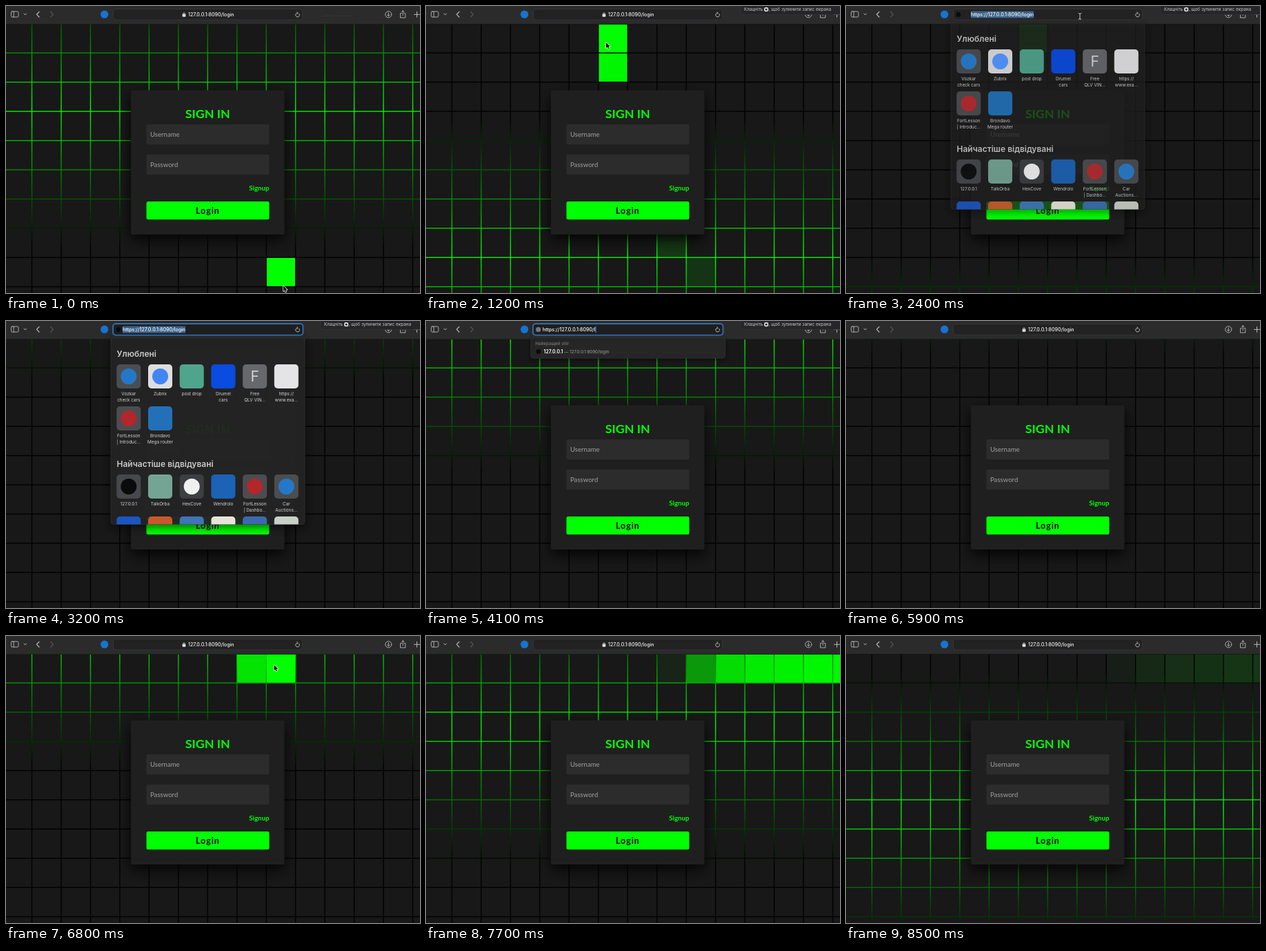
Recreate the animation shown at these times as an HTML page with a canvas. Size 600x417 px, loop 8.6 s.

```html
<!DOCTYPE html>
<html lang="uk">
<head>
<meta charset="utf-8">
<title>Sign in</title>
<style>
html, body { margin: 0; width: 100%; height: 100%; overflow: hidden; background: #181818; }
canvas { display: block; width: 600px; height: 417px; }
</style>
</head>
<body>
<canvas id="stage"></canvas>
<script>
const W = 600, H = 417, LOOP = 8600, STEP = 100;
const UI = 'Inter, "Noto Sans", sans-serif', FORM = 'Lato, "Open Sans", sans-serif';
const GREEN = '#00ff00';
const PITCH = 42.46, GRID_X = -47.4, GRID_Y = 25.7, GAP = 1.35;
const VIEW_H = 400, FADE = 1500;
const CARD = { x: 181, y: 122.5, w: 222.5, h: 209.5 };

const canvas = document.getElementById('stage');
const g = canvas.getContext('2d');
const dpr = window.devicePixelRatio || 1;
canvas.width = W * dpr;
canvas.height = H * dpr;

// Gradient centre, unwrapped: [time, y]; the page reloads at 5750
const bandKeys = [[0, 150], [1200, 362], [2400, 568], [4100, 818], [5200, 1000], [5740, 1086],
  [5750, -174.3], [6800, -8], [8500, 252], [8600, 268]];
// Pointer: [time, x, y]
const mouseKeys = [[0, 402, 406.5], [250, 402, 405], [300, 386, 374], [310, 368, 358], [360, 350, 326],
  [1000, 280, 130], [1010, 275, 105], [1100, 266, 72], [1200, 261, 53], [1500, 261, 50], [1700, 280, 30],
  [1800, 300, 14], [1950, 339, 15], [6300, 339, 15], [6500, 341, 40], [6600, 365, 46], [6640, 380, 46],
  [6700, 388, 43], [6800, 388.5, 42], [7100, 390, 42], [7300, 418, 45], [7500, 462, 46],
  [7560, 500, 45], [7640, 606, 44]];

// Address field edits: [time, typed path, suggested rest]
const edits = [[3300, 'login', ''], [3500, 'logi', ''], [3700, 'log', ''], [3900, 'lo', ''], [4000, 'l', ''],
  [4300, '', ''], [4600, 'r', 'oom'], [4800, 'ro', 'om'], [5000, 'roo', 'm']];

const clamp = v => Math.max(0, Math.min(1, v));
const mix = (a, b, p) => a + (b - a) * p;

function track(keys, t) {
  let i = keys.findIndex(k => k[0] > t);
  if (i < 0) return keys[keys.length - 1].slice(1);
  const a = keys[i - 1], b = keys[i], p = (t - a[0]) / (b[0] - a[0]);
  return a.slice(1).map((v, n) => mix(v, b[n + 1], p));
}

// CSS "ease"
function ease(x) {
  let lo = 0, hi = 1;
  for (let i = 0; i < 20; i++) {
    const s = (lo + hi) / 2, q = 1 - s;
    if (0.75 * q * q * s + 0.75 * q * s * s + s ** 3 < x) lo = s; else hi = s;
  }
  return 0.3 * (1 - lo) ** 2 * lo + 3 * (1 - lo) * lo * lo + lo ** 3;
}

function box(x, y, w, h, r, fill, stroke, lw = 1) {
  g.beginPath();
  g.roundRect(x, y, w, h, r);
  if (fill) { g.fillStyle = fill; g.fill(); }
  if (stroke) { g.strokeStyle = stroke; g.lineWidth = lw; g.stroke(); }
}

function dot(x, y, r, fill) {
  g.beginPath();
  g.arc(x, y, r, 0, 7);
  g.fillStyle = fill;
  g.fill();
}

function line(points, color, lw = 1) {
  g.beginPath();
  points.forEach(([x, y], i) => i ? g.lineTo(x, y) : g.moveTo(x, y));
  g.strokeStyle = color;
  g.lineWidth = lw;
  g.stroke();
}

function text(str, x, y, size, color, { font = UI, weight = 400, align = 'left', gap = 0 } = {}) {
  g.font = `${weight} ${size}px ${font}`;
  g.textAlign = align;
  g.textBaseline = 'alphabetic';
  g.letterSpacing = gap + 'px';
  g.fillStyle = color;
  g.fillText(str, x, y);
  const width = g.measureText(str).width;
  g.letterSpacing = '0px';
  return width;
}

function shadow(y, blur, alpha) {
  g.shadowColor = `rgba(0,0,0,${alpha})`;
  g.shadowOffsetY = y * dpr;
  g.shadowBlur = blur * dpr;
}

// Cells fade out after the pointer leaves them
function litCells(t) {
  const last = new Map();
  for (let s = Math.max(0, t - FADE); s <= t; s += 10) {
    const [x, y] = track(mouseKeys, s);
    const onCard = x > CARD.x && x < CARD.x + CARD.w && y > CARD.y && y < CARD.y + CARD.h;
    if (y < 26.5 || x > W || onCard) continue;
    last.set(Math.floor((x - GRID_X) / PITCH) + ',' + Math.floor((y - GRID_Y) / PITCH), s);
  }
  return last;
}

function drawGrid(t) {
  const top = GRID_Y - VIEW_H / 2;
  const raw = track(bandKeys, t)[0] - top;
  const mid = top + (raw + 2 * VIEW_H) % (2 * VIEW_H);
  const band = g.createLinearGradient(0, mid - VIEW_H / 2, 0, mid + VIEW_H / 2);
  band.addColorStop(0, '#000');
  band.addColorStop(0.5, GREEN);
  band.addColorStop(1, '#000');
  g.fillStyle = band;
  g.fillRect(0, 0, W, H);
  const lit = litCells(t);
  for (let r = 0; r < 10; r++) {
    for (let c = 1; c < 16; c++) {
      const s = lit.get(c + ',' + r);
      const p = s === undefined ? 0 : 1 - ease((t - s) / FADE);
      const rb = Math.round(mix(24, 0, p));
      g.fillStyle = `rgb(${rb},${Math.round(mix(24, 255, p))},${rb})`;
      g.fillRect(GRID_X + c * PITCH + GAP / 2, GRID_Y + r * PITCH + GAP / 2, PITCH - GAP, PITCH - GAP);
    }
  }
}

function drawCard() {
  g.save();
  shadow(8, 20, 0.85);
  box(CARD.x, CARD.y, CARD.w, CARD.h, 2, '#1f1f1f');
  g.restore();
  text('SIGN IN', 292.3, 162.5, 17.8, GREEN, { font: FORM, weight: 700, align: 'center' });
  [['Username', 172], ['Password', 215.8]].forEach(([label, y]) => {
    box(203.5, y, 178, 29.3, 2, '#2c2c2c');
    text(label, 209, y + 17.8, 9.6, '#a0a0a0', { font: FORM });
  });
  text('Signup', 381.5, 268, 9.7, GREEN, { font: FORM, weight: 700, align: 'right' });
  box(203.5, 284, 178, 26.2, 2.5, GREEN);
  text('Login', 275, 301.6, 12.4, '#000', { font: FORM, weight: 700, gap: 1 });
}

function drawToolbar() {
  const ink = '#b8b8b8';
  g.fillStyle = '#2b2b2c';
  g.fillRect(0, 0, W, 26.5);
  g.fillStyle = '#151515';
  g.fillRect(0, 26, W, 0.7);
  g.lineCap = g.lineJoin = 'round';
  box(7.5, 8, 10.5, 8, 1.5, null, ink, 0.9);
  line([[11.2, 8], [11.2, 16]], ink, 0.9);
  line([[26, 11], [27.8, 12.9], [29.6, 11]], ink);
  line([[48, 8.5], [44.4, 12.2], [48, 16]], ink, 1.2);
  line([[64.8, 8.5], [68.4, 12.2], [64.8, 16]], '#555', 1.2);
  dot(142.7, 12.2, 5.6, '#1674d1');
  g.beginPath();
  g.arc(554.3, 12.3, 4.6, 0, 7);
  g.strokeStyle = ink;
  g.lineWidth = 0.9;
  g.stroke();
  line([[554.3, 9.7], [554.3, 14.6]], ink, 0.9);
  line([[552.4, 12.8], [554.3, 14.7], [556.2, 12.8]], ink, 0.9);
  line([[573.3, 10.5], [571.6, 10.5], [571.6, 17], [578.8, 17], [578.8, 10.5], [577.1, 10.5]], ink, 0.9);
  line([[575.2, 13.6], [575.2, 6.8]], ink, 0.9);
  line([[573.4, 8.5], [575.2, 6.7], [577, 8.5]], ink, 0.9);
  line([[591.5, 12.3], [599.5, 12.3]], ink);
  line([[595.5, 8.3], [595.5, 16.3]], ink);
}

function drawReload() {
  g.beginPath();
  g.arc(422.6, 13, 2.9, -0.6, 4.6);
  g.strokeStyle = '#c4c4c4';
  g.lineWidth = 0.9;
  g.stroke();
  line([[421.8, 8.6], [423.4, 10.1], [421.8, 11.5]], '#c4c4c4', 0.8);
}

function suggestions(path, active) {
  g.save();
  shadow(2, 5, 0.5);
  box(152, 24, 281.5, 30, 4, '#262626', '#3b3b3b', 0.7);
  g.restore();
  text('Найкращий збіг', 158.5, 34.6, 6.2, '#6e6e6e', { weight: 600 });
  if (active) box(154.5, 38.8, 275.5, 11.2, 2.5, '#1656b4');
  dot(163, 44.4, 3.5, '#0b0b0d');
  const w = text('127.0.0.1', 170.5, 46.8, 7, '#fff', { weight: 600 });
  text(' — 127.0.0.1:8090/' + path, 170.5 + w, 46.6, 6.2, active ? '#d7e4f6' : '#a3a3a3');
}

function drawAddress(t) {
  const size = 7.05, base = 15.2, host = '127.0.0.1:8090/';
  const focused = t >= 2300 && t < 5600;
  box(155.5, 4.5, 274, 15.6, 4, '#222223', '#3c3c3d', 0.7);
  if (!focused) {
    box(255.6, 11.6, 4.8, 4.1, 0.8, '#ddd');
    g.beginPath();
    g.arc(258, 11.4, 1.5, Math.PI, 0);
    g.strokeStyle = '#ddd';
    g.lineWidth = 0.8;
    g.stroke();
    text(host + 'login', 264, base, size, '#f2f2f2', { weight: 500 });
    drawReload();
    return;
  }
  const edit = edits.filter(e => e[0] <= t).pop();
  if (edit) suggestions(edit[2] ? 'room' : 'login', !!edit[2]);
  if (t >= 2500) box(155, 4, 275.5, 16.6, 4, '#1e1e1f', '#2d6cae', 1.9);
  const x = t < 2400 ? 212 : t < 2500 ? 181 : 169;
  const url = 'https://' + host;
  if (edit && !edit[2]) dot(162.8, 12.4, 3.6, '#777');
  else dot(162.8, 12.4, 3.4, '#0b0b0d');
  g.font = `500 ${size}px ${UI}`;
  if (!edit) {
    const w = g.measureText(url + 'login').width;
    box(x, 7.6, w, 10, 0, '#3c638b');
    text(url + 'login', x, base, size, '#fff', { weight: 500 });
  } else {
    const end = x + text(url + edit[1], x, base, size, '#fff', { weight: 500 });
    if (edit[2]) {
      const tail = ' — 127.0.0.1';
      const w = g.measureText(edit[2] + tail).width;
      box(end, 7.6, w, 10, 0, '#2a578f');
      const head = text(edit[2], end, base, size, '#fff', { weight: 500 });
      text(tail, end + head, base, size, '#6b9ad6', { weight: 500 });
    } else {
      line([[end + 0.6, 8], [end + 0.6, 17]], '#4a9bff', 0.9);
    }
  }
  drawReload();
}

// Tiles: [first line, second line, tile colour, mark colour, letter]
const favourites = [
  ['Vozkar', 'check cars', '#4b4d50', '#2478c8'],
  ['Zubrix', '', '#dedede', '#4285f4'],
  ['post drop', '', '#4fa58c'],
  ['Drumel', 'cars', '#0a4be0'],
  ['Free', 'QLV VIN…', '#66686c', null, 'F'],
  ['https://', 'www.exa…', '#e4e4e6'],
  ['FortLesson', '| Introduc…', '#4b4d50', '#b3262b'],
  ['Brondavo', 'Mega router', '#2271b8']
];
const visited = [
  ['127.0.0.1', '', '#46484b', '#0b0b0d'],
  ['TalkOrba', '', '#74a594'],
  ['HexCove', '', '#3c3e42', '#f0f0f0'],
  ['Wendrolo', '', '#1c62b5'],
  ['FortLesson', '| Dashbo…', '#4b4d50', '#b3262b'],
  ['Car', 'Auctions…', '#4b4d50', '#2478c8']
];
const more = ['#1d55c0', '#c8582c', '#3f74b8', '#e8e2da', '#3d68b0', '#c9d0c6'];

function drawTile([a, b, fill, mark, letter], x, y) {
  box(x, y, 35, 35, 5, fill);
  const cx = x + 17.5;
  if (mark) dot(cx, y + 17.5, 11.5, mark);
  if (letter) text(letter, cx, y + 25, 21, '#d2d2d4', { align: 'center' });
  const style = { align: 'center' };
  text(a, cx, y + 45.2, 6.4, '#d4d4d4', style);
  text(b, cx, y + 53.6, 6.4, '#d4d4d4', style);
}

function drawFavourites(t) {
  if (t < 2300 || t >= 3300) return;
  const p = clamp(0.35 + (t - 2300) / 300);
  const tileX = i => 160.3 + (i % 6) * 45.7;
  g.save();
  g.globalAlpha = p;
  shadow(4, 12, 0.6);
  box(152, 24, 281, 271.5, 4, 'rgba(37,37,37,0.92)', '#3a3a3a', 0.6);
  g.restore();
  g.save();
  g.globalAlpha = clamp(p + 0.22);
  g.beginPath();
  g.rect(152, 24, 281, 271.5);
  g.clip();
  text('Улюблені', 160.5, 51.6, 12, '#c9c9c9', { weight: 600 });
  favourites.forEach((f, i) => drawTile(f, tileX(i), i < 6 ? 63 : 124));
  text('Найчастіше відвідувані', 160.5, 211.6, 12, '#c9c9c9', { weight: 600 });
  visited.forEach((f, i) => drawTile(f, tileX(i), 223));
  more.forEach((c, i) => box(tileX(i), 284, 35, 35, 5, c));
  g.restore();
}

// Screen-recording hint grows out of the toolbar
function drawHint(t) {
  if (t >= 5000) return;
  const p = clamp(t / 200), out = clamp((5000 - t) / 200);
  g.save();
  g.globalAlpha = mix(0.35, 1, p) * out;
  g.translate(mix(459, 456, p), mix(14, -4, p));
  g.scale(mix(0.34, 1, p), mix(0.12, 1, p));
  box(0, 0, 150, 16.5, 3, '#262629', '#3a3a3c', 0.5);
  const w = text('Клацніть ', 5, 11.3, 6.4, '#c8c8c8');
  dot(8 + w, 9, 3.2, '#d8d8d8');
  dot(8 + w, 9, 1.5, '#262629');
  text(', щоб зупинити запис екрана', 11.5 + w, 11.3, 6.4, '#c8c8c8');
  g.restore();
}

function drawPointer(t) {
  if (t >= 2900 && t < 6200) return;
  const [x, y] = track(mouseKeys, t);
  if (y < 22 && x > 155 && x < 430) {
    const bar = [[[x - 2, y - 4.5], [x, y - 3.6], [x + 2, y - 4.5]], [[x, y - 3.6], [x, y + 3.6]],
      [[x - 2, y + 4.5], [x, y + 3.6], [x + 2, y + 4.5]]];
    bar.forEach(b => line(b, '#111', 2));
    bar.forEach(b => line(b, '#eee', 0.9));
    return;
  }
  g.beginPath();
  [[0, 0], [0, 8], [1.8, 6.4], [3.1, 9.3], [4.4, 8.7], [3.2, 5.9], [5.6, 5.7]]
    .forEach(([dx, dy]) => g.lineTo(x + dx, y + dy));
  g.closePath();
  g.strokeStyle = '#fff';
  g.lineWidth = 1.4;
  g.stroke();
  g.fillStyle = '#000';
  g.fill();
}

function render(now) {
  let t = Math.floor((now % LOOP) / STEP) * STEP;
  if (t > 200 && t < 500) t = 200;
  g.setTransform(dpr, 0, 0, dpr, 0, 0);
  drawGrid(t);
  drawCard();
  drawToolbar();
  drawFavourites(t);
  drawAddress(t);
  drawHint(t);
  drawPointer(t);
}

let start = null;
function tick(now) {
  if (start === null) start = now;
  render(now - start);
  requestAnimationFrame(tick);
}
requestAnimationFrame(tick);
</script>
</body>
</html>
```
